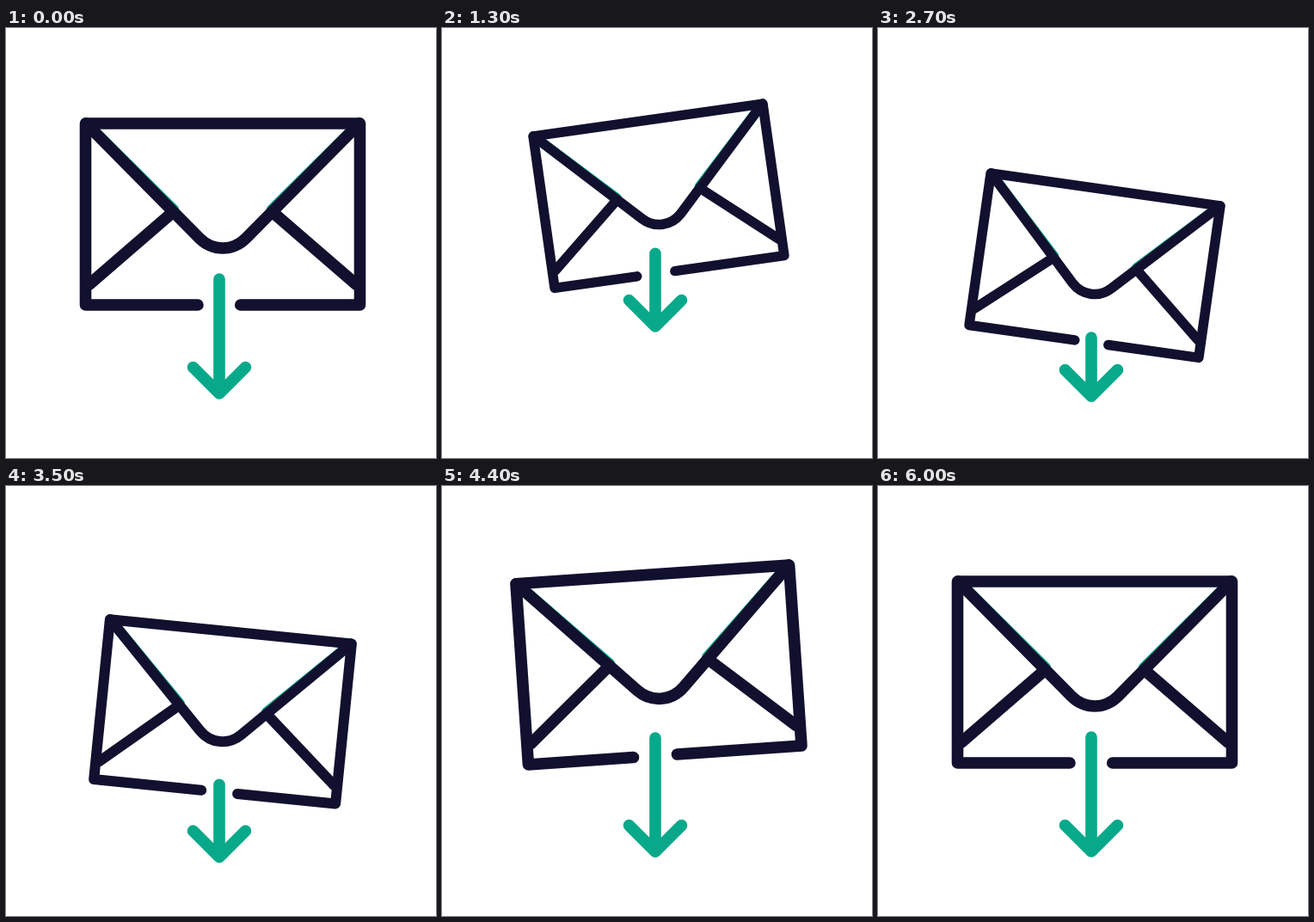
Write an HTML page that moves like this. It is 500 px wide and 500 px high and loops after 6100 ms.

```html
<!DOCTYPE html>
<html lang="en">
<head>
<meta charset="utf-8">
<title>Incoming mail</title>
<style>
  html, body { margin: 0; width: 100%; height: 100%; overflow: hidden; background: #fff; }
  svg { display: block; width: 100vw; height: 100vh; }
  path { fill: none; stroke: #11102f; stroke-width: 13.6; stroke-linecap: round; stroke-linejoin: round; }
  .green { stroke: #08a98b; }
</style>
</head>
<body>
<svg viewBox="0 0 500 500">
  <g id="envelope">
    <path class="green" d="M-159 -105.5L-57.5 -5M159 -105.5L57.5 -5"/>
    <path id="frame"/>
    <path d="M-155 81.5L-59 -1.5M155 81.5L59 -1.5"/>
    <path d="M-159 -105.5L-27 28C-11.7 43.3 11.7 43.3 27 28L159 -105.5"/>
  </g>
  <path id="arrow" class="green"/>
</svg>
<script>
const LOOP = 6100, STEP = 100;
const [envelope, frame, arrow] = ['envelope', 'frame', 'arrow'].map(id => document.getElementById(id));

// Key poses: lift, drop, swing back, settle. A track that ends early keeps its last value.
const times = [0, 980, 3000, 4500, 5300, 6000];
const height = [216.5, 189, 281.7, 207, 221.5, 216.5];
const tilt = [0, -9.3, 9.2, -4.1, 2.1, 0];
const size = [1, 0.845, 0.845, 1];
const arrowTop = [292, 254.8, 366.8, 292];
const arrowTip = [425, 340.8, 433.7, 425];

const ease = u => u * u * (3 - 2 * u);

function valueAt(track, t) {
  const i = times.findIndex(time => time > t);
  if (i < 0 || i >= track.length) return track[track.length - 1];
  const u = (t - times[i - 1]) / (times[i] - times[i - 1]);
  return track[i - 1] + (track[i] - track[i - 1]) * ease(u);
}

function draw(t) {
  const [y, angle, scale, top, tip] =
    [height, tilt, size, arrowTop, arrowTip].map(track => valueAt(track, t));
  // The gap slides along the bottom edge so that it stays above the arrow.
  const left = -29 + 2 * angle, right = 20.7 + 1.63 * angle;
  envelope.setAttribute('transform', `translate(252 ${y}) rotate(${angle}) scale(${scale})`);
  frame.setAttribute('d', `M${left} 105.5H-159.5V-105.5H159.5V105.5H${right}`);
  arrow.setAttribute('d', `M248 ${top}V${tip}m-30.5 -30.5l30.5 30.5l30.5 -30.5`);
}

const start = performance.now();
function tick() {
  const t = (performance.now() - start) % LOOP;
  draw(Math.floor(t / STEP) * STEP);
  requestAnimationFrame(tick);
}
tick();
</script>
</body>
</html>
```
